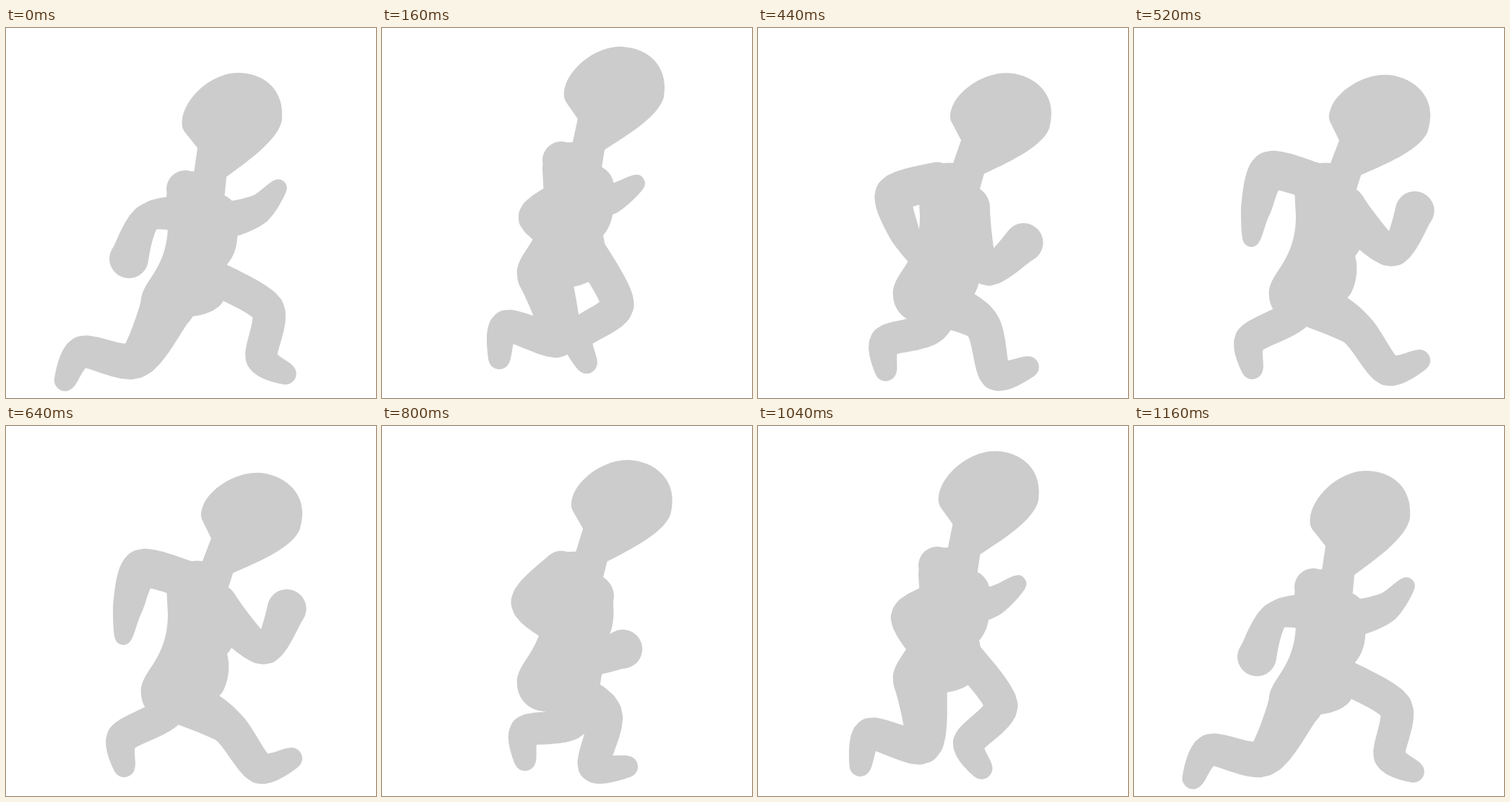
These frames come from a looping animation (512 px wide and 512 px high, 1.2 s). An HTML page:

```html
<!DOCTYPE html>
<html lang="en">
<head>
<meta charset="utf-8">
<title>Running figure</title>
<style>
html, body { margin: 0; width: 100%; height: 100%; overflow: hidden; background: #fff; }
svg { display: block; width: 100%; height: 100%; }
</style>
</head>
<body>
<svg viewBox="0 0 512 512">
  <g id="body" fill="#ccc">
    <path d="M274 199C250 194 223 208 222 235L224 272C224 310 210 332 197 351C186 368 184 380 190 391
      C196 401 225 402 251 400C275 398 295 390 301 377C307 365 311 345 306 327C318 313 322 295 320 270
      C320 255 314 248 304 234L285 220Z"/>
    <path id="head" d="M265 166L249 146C243 139 243 133 244 125C248 97 284 62 321 62
      C356 62 382 84 382 118C382 126 382 128 381 131C373 158 332 186 305 206L302 238L270 262L259 207Z"/>
    <g id="limbs"></g>
  </g>
</svg>
<script>
const STEP = 40, FRAMES = 30;
const BOB_TIMES = [0, 200, 480], BOB = [0, -50, -5];
const POSE_TIMES = [0, 180, 380, 520];

// A bone has a length, an end radius and its angle in degrees at each pose
const bone = (len, r, ...angles) => ({ len, r, angles });

const LIMBS = [
  { x: 225, y: 381, r: 38, bones: [ // near leg
    bone(91, 25, 120, 72, 21, 29),
    bone(75, 22, 189, 194, 90, 52),
    bone(46, 15, 121, 100, -10, -16)] },
  { x: 283, y: 343, r: 24, bones: [ // far leg
    bone(91, 23, 30, 66, 105, 133),
    bone(68, 22, 97, 148, 170, 151),
    bone(40, 15, 34, 79, 93, 87)] },
  { x: 248, y: 223, r: 26, bones: [ // pointed arm
    bone(62, 27, 42, 82, 139, 193),
    bone(54, 21, -13, -6, 50, 110),
    bone(43, 12, -46, -29, 34, 99)] },
  { x: 290, y: 260, r: 31, bones: [ // fist arm
    bone(91, 19, 180, 151, 98, 43),
    bone(66, 27, 116, 25, -18, -61)] }
];

const body = document.getElementById("body");
const head = document.getElementById("head");
const limbs = document.getElementById("limbs");

// Straight lines between keys, running on past the last one
function track(times, values, t) {
  let i = 0;
  while (i < times.length - 2 && t >= times[i + 1]) i++;
  const k = (t - times[i]) / (times[i + 1] - times[i]);
  return values[i] + (values[i + 1] - values[i]) * k;
}

// Vertical bounce: same slope up and down after the last key
function bob(t) {
  return track(BOB_TIMES, BOB, t <= 480 ? t : 960 - t);
}

// Outline around two circles
function capsule(p, q) {
  const a = Math.atan2(q.y - p.y, q.x - p.x);
  const d = Math.hypot(q.x - p.x, q.y - p.y) || 1;
  const b = Math.acos(Math.max(-0.99, Math.min(0.99, (p.r - q.r) / d)));
  const at = (c, ang) =>
    (c.x + c.r * Math.cos(ang)).toFixed(2) + " " + (c.y + c.r * Math.sin(ang)).toFixed(2);
  const big = b < Math.PI / 2 ? 1 : 0;
  return `M${at(p, a + b)}A${p.r} ${p.r} 0 ${big} 1 ${at(p, a - b)}` +
    `L${at(q, a - b)}A${q.r} ${q.r} 0 ${1 - big} 1 ${at(q, a + b)}Z`;
}

// Point on a soft curve through the joints
function along(joints, i, k) {
  const p = joints[i], q = joints[i + 1];
  const before = joints[i - 1] || p, after = joints[i + 2] || q;
  const h = k * k * (3 - 2 * k), bend = 0.4;
  const mix = axis => p[axis] + (q[axis] - p[axis]) * h +
    bend * (q[axis] - before[axis]) * k * (1 - k) ** 2 -
    bend * (after[axis] - p[axis]) * k * k * (1 - k);
  return { x: mix("x"), y: mix("y"), r: p.r + (q.r - p.r) * k };
}

function limbPath({ x, y, r, bones }, t) {
  const joints = [{ x, y, r }];
  for (const { len, r, angles } of bones) {
    const a = track(POSE_TIMES, angles, t) * Math.PI / 180;
    const p = joints[joints.length - 1];
    joints.push({ x: p.x + len * Math.cos(a), y: p.y + len * Math.sin(a), r });
  }
  const parts = 8;
  let d = "", last = joints[0];
  for (let i = 1; i <= bones.length * parts; i++) {
    const seg = Math.floor((i - 1) / parts);
    const next = along(joints, seg, i / parts - seg);
    d += capsule(last, next);
    last = next;
  }
  return d;
}

for (const limb of LIMBS) {
  limb.el = document.createElementNS("http://www.w3.org/2000/svg", "path");
  limbs.append(limb.el);
}

// The stride plays forward, then back
function draw(ms) {
  const n = Math.floor(ms / STEP) % FRAMES;
  const t = Math.min(n, FRAMES - 1 - n) * STEP;
  body.setAttribute("transform", `translate(0 ${bob(t)})`);
  head.setAttribute("transform", `rotate(${t * 0.0243} 270 252)`);
  for (const limb of LIMBS) limb.el.setAttribute("d", limbPath(limb, t));
}

let start;
function tick(now) {
  start ??= now;
  draw(Math.max(0, now - start));
  requestAnimationFrame(tick);
}
draw(0);
requestAnimationFrame(tick);
</script>
</body>
</html>
```
